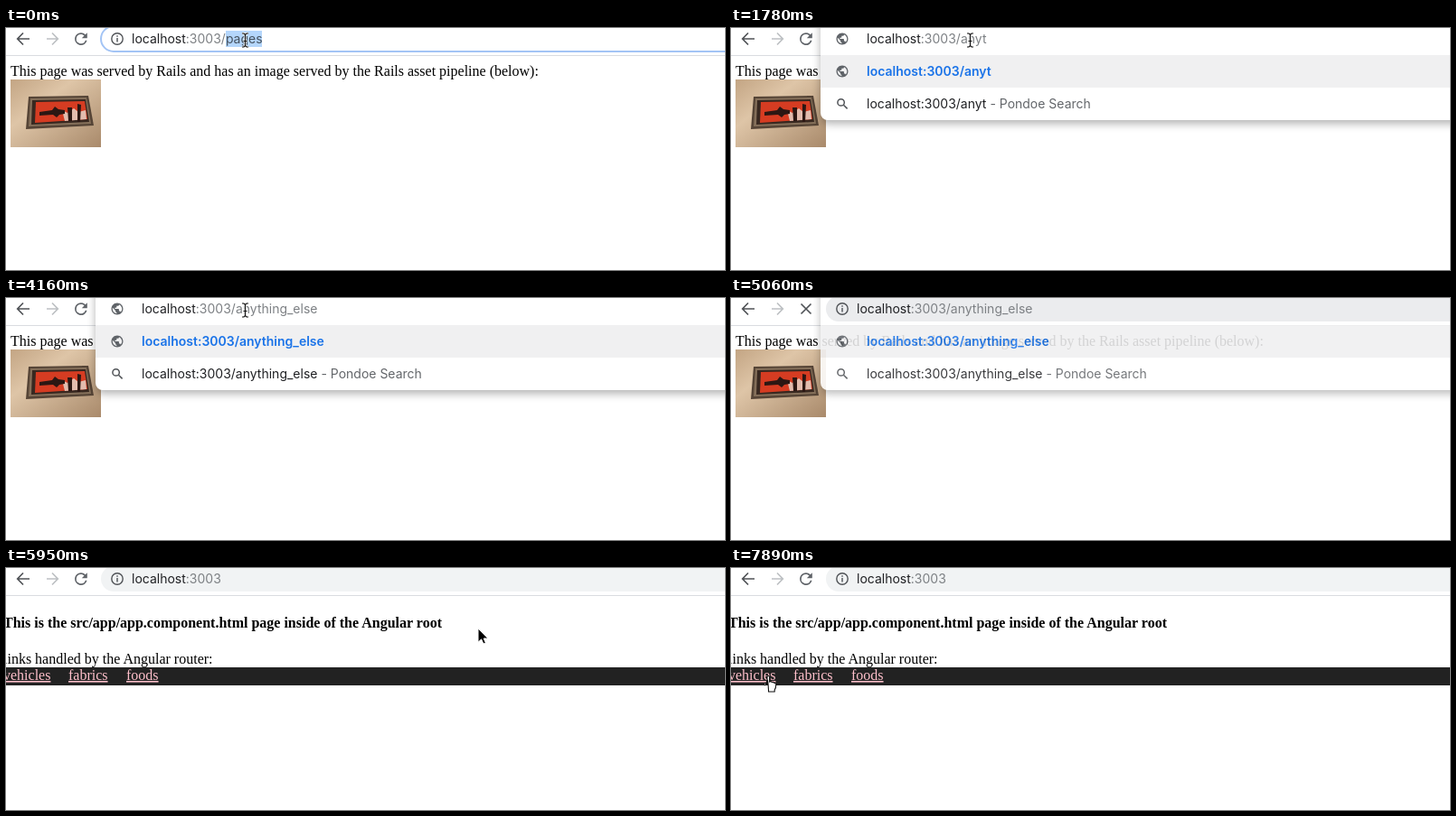
An HTML page for the animation above (8 s loop, 795 px wide and 268 px high).

```html
<!DOCTYPE html>
<html lang="en">
<head>
<meta charset="utf-8">
<title>Routing demo</title>
<style>
  html, body { margin: 0; width: 100%; height: 100%; overflow: hidden; background: #fff; }
  svg { display: block; }
  text { white-space: pre; }
  .ui { font: 14px Inter, "Open Sans", sans-serif; fill: #202124; }
  .dim { fill: #7d8084; }
  .soft { fill: #63666a; }
  .bold { font-weight: 600; fill: #1a73e8; }
  .page { font: 16px "Liberation Serif", serif; fill: #000; }
  .link { fill: #ffc0cb; text-decoration: underline; }
  .line { fill: none; stroke: #505357; stroke-width: 1.7; }
  .icon { fill: #5f6368; }
  #panel { filter: drop-shadow(0 4px 5px rgba(0, 0, 0, .3)); }
</style>
</head>
<body>
<svg width="795" height="268" viewBox="0 0 795 268">
  <defs>
    <linearGradient id="wood" x2="1" y2="1">
      <stop offset="0" stop-color="#c3a584"/>
      <stop offset=".35" stop-color="#dec5a7"/>
      <stop offset="1" stop-color="#a98a6b"/>
    </linearGradient>
    <path id="globe" d="M12 2C6.48 2 2 6.48 2 12s4.48 10 10 10 10-4.48 10-10S17.52 2 12 2zm-1 17.93c-3.95-.49-7-3.85-7-7.93 0-.62.08-1.21.21-1.79L9 15v1c0 1.1.9 2 2 2v1.93zm6.9-2.54c-.26-.81-1-1.39-1.9-1.39h-1v-3c0-.55-.45-1-1-1H8v-2h2c.55 0 1-.45 1-1V7h2c1.1 0 2-.9 2-2v-.41c2.93 1.19 5 4.06 5 7.41 0 2.08-.8 3.97-2.1 5.39z"/>
  </defs>

  <path d="M0 30.5H795" stroke="#dadce0"/>

  <g id="rails">
    <text class="page" x="5" y="53">This page was served by Rails and has an image served by the Rails asset pipeline (below):</text>
    <path fill="url(#wood)" d="M5 57h100v75H5z"/>
    <path fill="#554436" d="M25 76L91 75 97 108 22 112z"/>
    <path fill="#85705a" d="M27 78L89 77 94 106 25 109z"/>
    <path fill="#382820" d="M29 80L88 79 92 104 28 107z"/>
    <path fill="#d63c22" d="M33 82L87 81 90 101 32 105z"/>
    <path fill="#e3bcae" d="M62 91l6 3 7-5 5 4 8-2 1 10-24 2z"/>
    <path fill="#2c1713" d="M37 93l14-2 3-4 4 3 7 1v4l-6 1-3 3-4-3-15 1zM68 88h5v15h-4zM79 84l4 1-1 19h-3z"/>
  </g>

  <g id="angular">
    <text class="page" x="-3" y="66" font-weight="bold" style="font-weight:bold">This is the src/app/app.component.html page inside of the Angular root</text>
    <text class="page" x="-3" y="106">links handled by the Angular router:</text>
    <path fill="#222" d="M0 110h795v20H0z"/>
    <text class="page link" x="-3" y="124">vehicles</text>
    <text class="page link" x="69" y="124">fabrics</text>
    <text class="page link" x="133" y="124">foods</text>
  </g>

  <path class="line" d="M26 12H13M19 5.5L12.7 12l6.3 6.5"/>
  <path class="line" style="stroke:#bdc0c3" d="M45 12h12M51 5.5l6.3 6.5-6.3 6.5"/>
  <path id="reload" class="icon" transform="translate(72.6 1.8) scale(.86)" d="M17.65 6.35A7.96 7.96 0 0 0 12 4a8 8 0 1 0 7.73 10h-2.08A6 6 0 1 1 12 6c1.66 0 3.14.69 4.22 1.78L13 11h7V4z"/>
  <path id="stop" class="line" d="M77.5 6.5l11 11m0-11l-11 11"/>

  <g id="panel">
    <path fill="#fff" d="M99-20H820V102H107a8 8 0 0 1-8-8z"/>
    <path fill="#f0f0f1" d="M99 30H820v36H99z"/>
    <use id="topGlobe" href="#globe" class="icon" transform="translate(115.2 4.2) scale(.65)"/>
    <use href="#globe" class="icon" transform="translate(115.2 40.2) scale(.65)"/>
    <g class="line" style="stroke-width:1.5"><circle cx="121.6" cy="82.4" r="3.7"/><path d="M124.4 85.2l4.2 4.2"/></g>
    <text id="typed" class="ui" x="150" y="17">localhost<tspan class="dim">:3003/<tspan data-q></tspan></tspan></text>
    <text class="ui bold" x="150" y="53">localhost:3003/<tspan data-q></tspan></text>
    <text class="ui" x="150" y="89">localhost:3003/<tspan data-q></tspan><tspan class="soft"> - Pondoe Search</tspan></text>
    <path id="caret" stroke="#303236" d="M.5 3v17"/>
  </g>

  <g id="bar">
    <rect id="pill" x="105" y="-2" width="760" height="28" rx="14"/>
    <circle class="line" style="stroke-width:1.4" cx="123" cy="12" r="6.2"/>
    <path class="icon" d="M122.2 11h1.6v4.5h-1.6zM122.2 8.2h1.6v1.6h-1.6z"/>
    <path id="mark" fill="#b4d6fb" d="M243 3h40v18h-40z"/>
    <text class="ui" x="139" y="17">localhost<tspan class="dim">:3003<tspan id="path"></tspan></tspan><tspan id="picked" fill="#45525f"></tspan></text>
  </g>

  <g id="beam" fill="none">
    <path stroke="#fff" stroke-width="2.6" d="M-3.5-7.5h2L0-6l1.5-1.5h2M0-6V6M-3.5 7.5h2L0 6l1.5 1.5h2M-2 1h4"/>
    <path stroke="#111" stroke-width="1.2" d="M-3.5-7.5h2L0-6l1.5-1.5h2M0-6V6M-3.5 7.5h2L0 6l1.5 1.5h2M-2 1h4"/>
  </g>
  <path id="arrow" stroke="#fff" d="M0 0V15.2L3.6 11.9 5.9 17 8.4 15.9 6.2 11H11z"/>
  <path id="hand" fill="#fff" stroke="#111" stroke-width="1.1" stroke-linejoin="round" d="M-2 0c0-2 2.6-2 2.6 0v5.2c.5-.9 2.5-.7 2.7.5.6-.7 2.3-.4 2.5.8.8-.5 2 0 2 1.2 0 3-.3 4.5-1.6 6.3v2H-.5v-1.8C-2-10-2 12-5.2 8.3c-.9-1.2.8-2.5 2-1.3L-2 8.2z"/>
</svg>
<script>
const LOOP = 8000;
const $ = id => document.getElementById(id);

// time, changes to the state so far
const steps = [
  [0, { page: 'rails', mode: 'select', url: '/', busy: 0, mouse: ['beam', 264.5, 13.5] }],
  [1040, { mode: 'type', q: 'a', caret: 1 }],
  [1190, { q: 'any' }],
  [1340, { q: 'anyt' }],
  [1780, { caret: 0 }],
  [2080, { q: 'anythi', caret: 1 }],
  [2380, { q: 'anythin' }],
  [2830, { caret: 0 }],
  [2970, { q: 'anything', caret: 1 }],
  [3270, { q: 'anything_' }],
  [3420, { q: 'anything_e' }],
  [3570, { q: 'anything_el' }],
  [3720, { q: 'anything_else' }],
  [4160, { caret: 0 }],
  [4310, { mouse: null }],
  [4760, { caret: 1 }],
  [5060, { mode: 'fade', url: '/anything_else', caret: 0, busy: 1 }],
  [5200, { mode: 'rest' }],
  [5500, { mode: 'hover', mouse: ['beam', 524.5, 17] }],
  [5650, { page: '', mouse: ['beam', 524.5, 23] }],
  [5800, { page: 'angular', mode: 'rest', url: '', mouse: ['arrow', 523, 48] }],
  [5950, { busy: 0, mouse: ['arrow', 522, 67] }],
  [6250, { mouse: ['arrow', 518, 70] }],
  [6400, { mouse: ['arrow', 504, 75] }],
  [6550, { mouse: ['arrow', 488, 78] }],
  [6700, { mouse: ['arrow', 480, 78] }],
  [6990, { mouse: ['arrow', 473.5, 78] }],
  [7290, { mouse: ['arrow', 420, 84] }],
  [7440, { mouse: ['arrow', 275, 100] }],
  [7590, { mouse: ['arrow', 130, 112] }],
  [7740, { mouse: ['hand', 58, 119] }],
  [7890, { mouse: ['hand', 42, 121] }]
];

const show = (id, on) => $(id).style.display = on ? '' : 'none';

function draw(s) {
  const typing = s.mode === 'type', fading = s.mode === 'fade', picking = s.mode === 'select';
  show('rails', s.page === 'rails');
  show('angular', s.page === 'angular');
  show('reload', !s.busy);
  show('stop', s.busy);

  show('panel', typing || fading);
  $('panel').style.opacity = fading ? .88 : 1;
  show('typed', typing);
  show('topGlobe', typing);
  document.querySelectorAll('[data-q]').forEach(e => e.textContent = s.q || '');
  show('caret', s.caret);
  if (typing) {
    const x = Math.round(150 + $('typed').getComputedTextLength());
    $('caret').setAttribute('transform', `translate(${x})`);
  }

  show('bar', !typing);
  show('mark', picking);
  $('pill').setAttribute('fill', picking ? '#fff' : s.mode === 'rest' ? '#f1f3f4' : '#ebecee');
  $('pill').setAttribute('stroke', picking ? '#a3c4f5' : 'none');
  $('pill').setAttribute('stroke-width', 2);
  $('path').textContent = s.url;
  $('picked').textContent = picking ? 'pages' : '';

  for (const kind of ['beam', 'arrow', 'hand']) {
    const on = s.mouse && s.mouse[0] === kind;
    show(kind, on);
    if (on) $(kind).setAttribute('transform', `translate(${s.mouse[1]} ${s.mouse[2]})`);
  }
}

let last = -1;
function tick() {
  const t = performance.now() % LOOP;
  const n = steps.filter(([at]) => at <= t).length;
  if (n !== last) {
    draw(Object.assign({}, ...steps.slice(0, n).map(([, change]) => change)));
    last = n;
  }
  requestAnimationFrame(tick);
}
tick();
</script>
</body>
</html>
```
